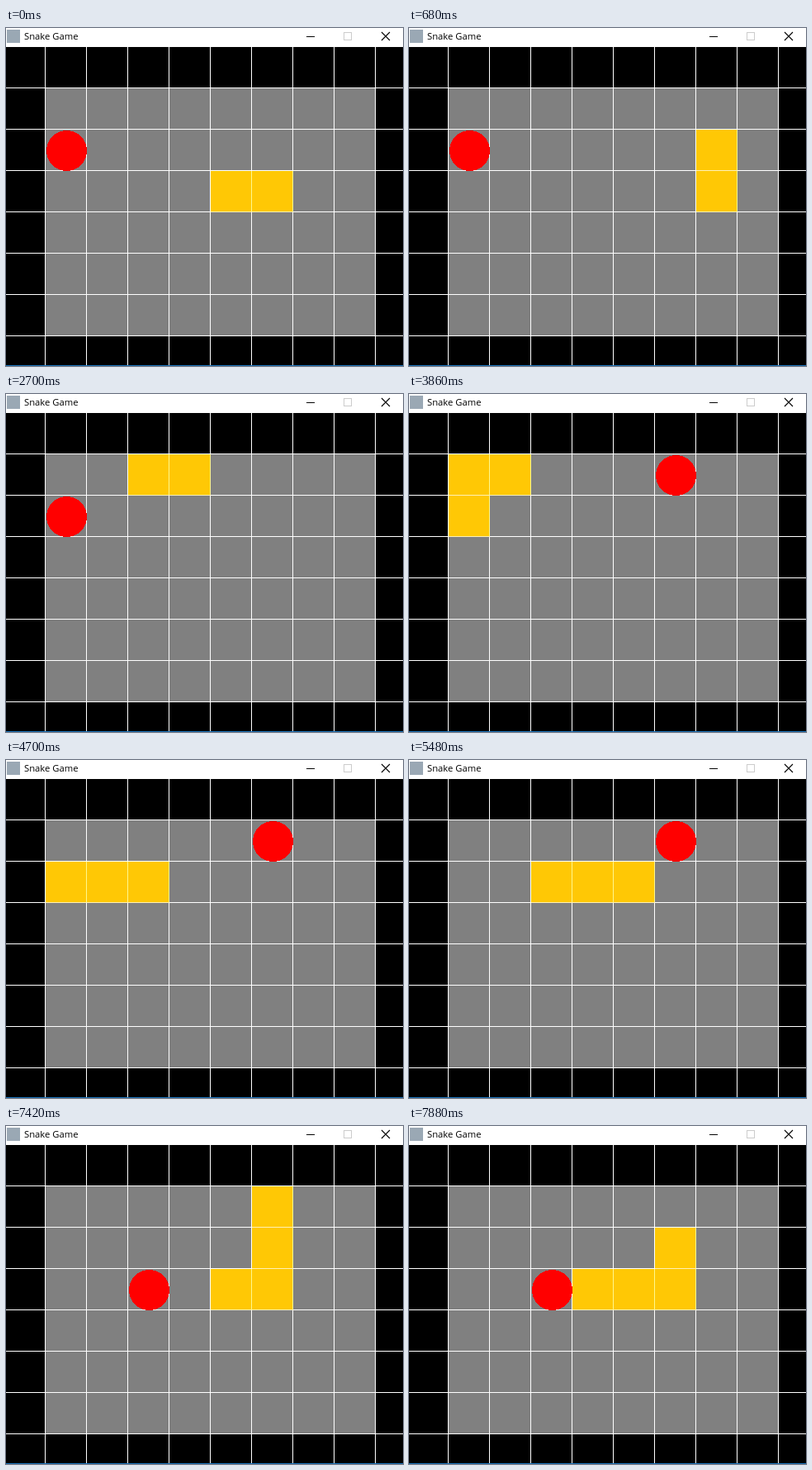
These frames come from a looping animation (481x409 px, 8000 ms). An HTML page:

```html
<!DOCTYPE html>
<html lang="en">
<head>
<meta charset="utf-8">
<title>Snake Game</title>
<style>
  html, body { margin: 0; width: 100%; height: 100%; overflow: hidden; background: #fff; }
  svg { display: block; width: 481px; height: 409px; }
  text { font: 11.25px "Open Sans", "Noto Sans", sans-serif; }
</style>
</head>
<body>
<svg viewBox="0 0 481 409" shape-rendering="crispEdges">
  <rect width="481" height="409" fill="#fff"/>
  <rect x="1" y="2" width="16" height="16" fill="#9aa8b4"/>
  <text x="22" y="14">Snake Game</text>
  <path d="M364 10.5h10" stroke="#000"/>
  <rect x="409.5" y="5.5" width="9" height="9" fill="none" stroke="#ccc"/>
  <path d="M455 5l10 10M465 5l-10 10" stroke="#000" stroke-width="1.1" shape-rendering="auto"/>
  <rect y="23" width="481" height="385" fill="#000"/>
  <rect x="48" y="73" width="400" height="300" fill="#808080"/>
  <path id="grid" stroke="#fff" fill="none"/>
  <path id="body" fill="#ffc805"/>
  <path id="right" fill="#fff78c"/>
  <path id="bottom" fill="#fff0b4"/>
  <circle id="food" r="24.5" fill="#f00"/>
  <rect y="408" width="481" height="1" fill="#1c74bc"/>
</svg>
<script>
  const CELL = 50, LEFT = 48, TOP = 73, LOOP = 8000;
  const el = id => document.getElementById(id);

  // Moments at which the snake advances one cell
  const ticks = [280, 680, 1060, 1520, 1920, 2300, 2700, 3080, 3460, 3860,
    4240, 4700, 5100, 5480, 5880, 6260, 6640, 7040, 7420, 7880];

  // Meals: the step at which each piece of food appears, and its cell
  const meals = [[0, 0, 1], [10, 5, 0], [16, 2, 2]];

  const dirs = { R: [1, 0], L: [-1, 0], U: [0, -1], D: [0, 1] };
  const trail = [[4, 2]];
  for (const turn of "RRUULLLLLLDRRRRURDDLL") {
    const [x, y] = trail[trail.length - 1];
    trail.push([x + dirs[turn][0], y + dirs[turn][1]]);
  }

  let lines = "";
  for (let x = LEFT - 0.5; x < 481; x += CELL) lines += `M${x} 23V408`;
  for (let y = TOP - 0.5; y < 408; y += CELL) lines += `M0 ${y}H481`;
  el("grid").setAttribute("d", lines);

  const box = (x, y, w, h) => `M${x} ${y}h${w}v${h}h${-w}z`;
  const join = (cells, shape) =>
    cells.map(([c, r]) => shape(LEFT + c * CELL, TOP + r * CELL)).join("");

  function draw(time) {
    const step = ticks.filter(t => t <= time).length;
    const eaten = meals.filter(m => m[0] <= step).length - 1;
    const snake = trail.slice(step - eaten, step + 2);
    const [, col, row] = meals[eaten];

    el("body").setAttribute("d", join(snake, (x, y) => box(x, y, 49, 49)));
    el("right").setAttribute("d", join(snake, (x, y) => box(x + 49, y, 1, 49)));
    el("bottom").setAttribute("d", join(snake, (x, y) => box(x, y + 49, 50, 1)));
    el("food").setAttribute("cx", LEFT + col * CELL + 25.5);
    el("food").setAttribute("cy", TOP + row * CELL + 25.5);
  }

  const start = performance.now();
  function frame() {
    draw((performance.now() - start) % LOOP);
    requestAnimationFrame(frame);
  }
  frame();
</script>
</body>
</html>
```
